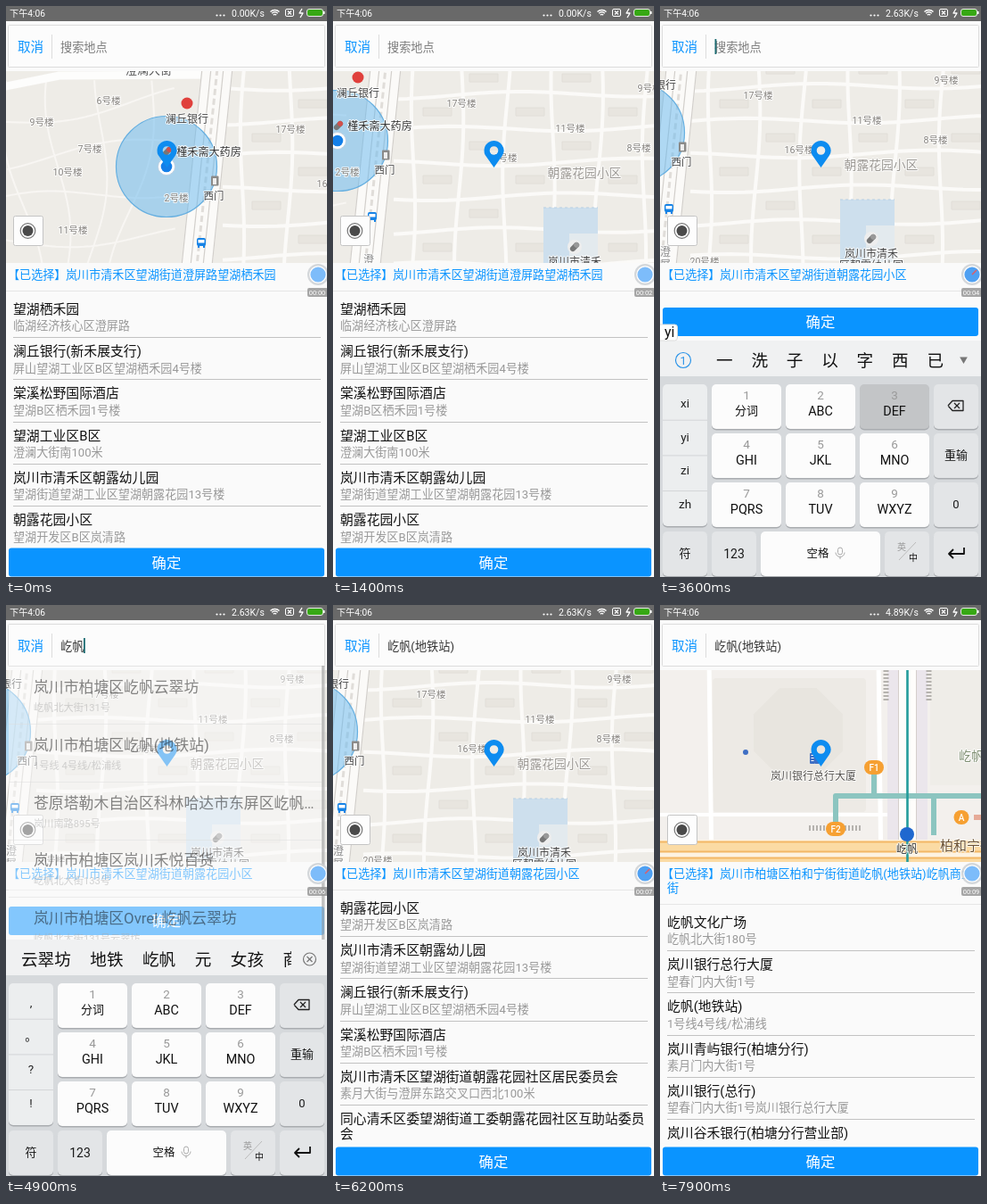
Write an HTML page with a canvas that moves like this. It is 360 px wide and 640 px high and loops after 8 s.

```html
<!DOCTYPE html>
<html lang="zh-CN">
<meta charset="utf-8">
<style>
html,body{margin:0;width:100%;height:100%;overflow:hidden;background:#fafafa}
canvas{display:block;width:360px;height:640px}
</style>
<canvas id="stage" width="360" height="640"></canvas>
<script>
const c = document.getElementById('stage').getContext('2d');
const BLUE = '#0a94ff', FONT = 'Roboto,"Noto Sans CJK SC","Noto Sans CJK",sans-serif';
const clamp = v => Math.min(1, Math.max(0, v));

// ---- drawing helpers; text is placed by its vertical centre ----
function txt(s, x, y, size, color, align = 'left', halo = 0, weight = 400) {
  c.font = `${weight} ${size}px ${FONT}`;
  c.textAlign = align;
  y += size * .36;
  if (halo) { c.strokeStyle = '#fffc'; c.lineWidth = halo; c.lineJoin = 'round'; c.strokeText(s, x, y); }
  c.fillStyle = color;
  c.fillText(s, x, y);
}
const label = (s, x, y, size, color = '#444') => txt(s, x, y, size, color, 'center', 2);
function rect(x, y, w, h, fill) { c.fillStyle = fill; c.fillRect(x, y, w, h); }
function paint(fill, stroke, w = 1) {
  if (fill) { c.fillStyle = fill; c.fill(); }
  if (stroke) { c.strokeStyle = stroke; c.lineWidth = w; c.stroke(); }
}
function box(x, y, w, h, r, fill, stroke) {
  c.beginPath(); c.roundRect(x, y, w, h, r); paint(fill, stroke);
}
function dot(x, y, r, fill, stroke, w) {
  c.beginPath(); c.arc(x, y, r, 0, 7); paint(fill, stroke, w);
}
function line(p, w, color, dash = []) {
  c.beginPath();
  for (let i = 0; i < p.length; i += 2) c.lineTo(p[i], p[i + 1]);
  c.setLineDash(dash); c.lineJoin = 'round';
  paint(null, color, w); c.setLineDash([]);
}
function ngon(x, y, r, n, fill, turn = 0) {
  c.beginPath();
  for (let i = 0; i < n; i++) {
    const a = turn + i / n * 2 * Math.PI;
    c.lineTo(x + r * Math.cos(a), y + r * Math.sin(a));
  }
  c.closePath(); paint(fill);
}
// gently winding lane between two points
function lane(x1, y1, x2, y2, w, color, bend = 4, phase = 0) {
  const p = [], dx = x2 - x1, dy = y2 - y1, len = Math.hypot(dx, dy);
  for (let i = 0; i <= 24; i++) {
    const f = i / 24, k = bend * Math.sin(f * len / 45 + phase) / len;
    p.push(x1 + dx * f - dy * k, y1 + dy * f + dx * k);
  }
  line(p, w, color);
}
function cross(x, y, r, color) {
  line([x - r, y - r, x + r, y + r], 1.2, color);
  line([x + r, y - r, x - r, y + r], 1.2, color);
}

// ---- texts ----
const addresses = [
  ['岚川市清禾区望湖街道澄屏路望湖栖禾园'],
  ['岚川市清禾区望湖街道朝露花园小区'],
  ['岚川市柏塘区柏和宁街街道屹帆(地铁站)屹帆商业', '街']
];
const garden = '朝露花园小区|望湖开发区B区岚清路';
const nursery = '岚川市清禾区朝露幼儿园|望湖街道望湖工业区望湖朝露花园13号楼';
const bank = '澜丘银行(新禾展支行)|屏山望湖工业区B区望湖栖禾园4号楼';
const hotel = '棠溪松野国际酒店|望湖B区栖禾园1号楼';
const lists = [
  ['望湖栖禾园|临湖经济核心区澄屏路', bank, hotel, '望湖工业区B区|澄澜大街南100米', nursery, garden],
  [garden, nursery, bank, hotel,
    '岚川市清禾区望湖街道朝露花园社区居民委员会|素月大街与澄屏东路交叉口西北100米',
    '同心清禾区委望湖街道工委朝露花园社区互助站委员|会'],
  ['屹帆文化广场|屹帆北大街180号',
    '岚川银行总行大厦|望春门内大街1号',
    '屹帆(地铁站)|1号线4号线/松浦线',
    '岚川青屿银行(柏塘分行)|素月门内大街1号',
    '岚川银行(总行)|望春门内大街1号岚川银行总行大厦',
    '岚川谷禾银行(柏塘分行营业部)|']
];
const results = [
  '岚川市柏塘区屹帆云翠坊|屹帆北大街131号',
  '岚川市柏塘区屹帆(地铁站)|1号线 4号线/松浦线',
  '苍原塔勒木自治区科林哈达市东屏区屹帆…|岚川南路895号',
  '岚川市柏塘区岚川禾悦百货|屹帆北大街133号',
  '岚川市柏塘区Ovrel 屹帆云翠坊|屹帆北大街131号云翠坊'
];

// ---- maps ----
function busIcon(x, y) {
  box(x - 5, y - 5, 10, 9, 2, '#1683e6');
  rect(x - 3.5, y - 3, 7, 3.5, '#fff');
  for (const d of [-4, 2]) rect(x + d, y + 3, 2, 3, '#1683e6');
}
function towerIcon(x, y) {
  box(x - 4, y - 6, 6, 12, 1, '#3f6fc4'); rect(x + 2, y - 1, 4, 7, '#3f6fc4');
  for (let i = 0; i < 3; i++) rect(x - 2.5, y - 4 + i * 3, 3, 1, '#fff');
}
function pill(x, y, color) {
  c.save(); c.translate(x, y); c.rotate(-.8);
  box(-6, -3, 12, 6, 3, '#777'); box(0, -3, 6, 6, 3, color);
  c.restore();
}

function suburbMap(shift) {
  rect(-20, 40, 640, 330, '#eeece7');
  // footpaths west of the avenue, garden lanes east of it
  for (let i = 0; i < 4; i++) {
    lane(i * 55, 84, i * 32 + 30, 300, 2, '#f8f6f3', 12, i);
    lane(0, 130 + i * 45, 190, 100 + i * 52, 2, '#f8f6f3', 9, i * 2);
  }
  for (let i = 0; i < 7; i++) {
    lane(243, 92 + i * 38, 610, 88 + i * 38, 4, '#fbfaf8', 3.5, i * 1.7);
    lane(268 + i * 52, 60, 262 + i * 52, 340, 4, '#fbfaf8', 3.5, i * 2.3);
    for (let j = 0; j < 7; j++)
      if ((i + j) % 2) box(276 + i * 52, 105 + j * 38, 32, 9, 0, '#e8e5df', '#e1ded8');
  }
  line([-10, 92, 60, 78, 240, 77], 9, '#fdfdfc');
  // avenue with side lanes
  const avenue = d => [238 + d, 60, 210 + d, 330];
  line(avenue(0), 35, '#fbfaf8');
  for (const d of [-17, -7, 7, 17]) line(avenue(d), 1.2, '#d2cfcb');
  line(avenue(0), 3, '#e0ddd9', [7, 4]);
  // pond
  rect(411, 255, 61, 70, '#cddfed'); rect(440, 284, 32, 41, '#e3eaee');
  line([411, 255, 472, 255], 1.2, '#b8d0e4', [3, 3]);

  dot(180, 180, 56.5, 'rgba(100,184,240,.5)', '#66afe0', 1.2);
  dot(180, 180, 9.5, '#fff', '#bcd', .8); dot(180, 180, 6.3, '#147fe8');
  const blocks = '6,115,106 9,40,130 7,94,160 10,69,186 11,75,251 2,191,215 17,319,138 16,365,199 9,530,121 11,441,166 8,518,188 20,259,324';
  for (const b of blocks.split(' ')) {
    const [n, x, y] = b.split(',');
    label(n + '号楼', +x, +y, 10.6, '#85827e');
  }
  label('澄澜大街', 160, 71, 13, '#555');
  dot(203, 109, 6.5, '#e0403c');
  label('澜丘银行', 203, 127, 12);
  if (181 + shift > -10) { // dropped once its icon leaves the view
    pill(181, 163, '#d0504c');
    label('槿禾斋大药房', 227.5, 164, 12.1, '#333');
  }
  box(230, 190.5, 8.5, 11, 1, '#8b8a88'); rect(232, 193, 4, 7, '#eee');
  label('西门', 233, 213, 11.4);
  busIcon(219, 265);
  [...'澄屏'].forEach((s, i) => label(s, 215, 314 + i * 14, 12, '#888'));
  label('朝露花园小区', 457, 216, 13.8, '#9b9893');
  dot(446, 299, 8, '#eee'); pill(446, 299, '#999');
  label('岚川市清禾', 446, 316, 12);
  label('区朝露幼儿园', 446, 329, 12);
}

function badge(s, x, y) {
  const w = s.length > 1 ? 22 : 17;
  box(x - w / 2, y - 8, w, 16, 8, '#f6a032');
  txt(s, x, y, 10, '#fff', 'center', 0, 500);
}
function cityMap() {
  const mid = 203, axis = 180.5;
  rect(-110, -20, 560, 340, '#f3f0ed');
  rect(206, -10, 170, 135, '#efede8');
  for (const x of [158, 191]) rect(x, -20, 12, 340, '#ebe6ec');
  box(-38, 5, 172, 150, 4, '#edeae5'); ngon(58, 66, 54, 8, '#e8e5df', .39);
  for (const x of [-42, 148, 326]) line([x, -20, x + 4, 310], 5, '#fff');
  for (const s of [-1, 1]) line([-110, mid + s * 45, 158, mid + s * 45], 4, '#fff');
  // avenue: white to the north, trunk colour to the south
  rect(axis - 10, -20, 20, 340, '#fefdfb');
  for (const s of [-1, 1]) {
    line([axis + s * 10, -20, axis + s * 10, 310], 1, '#d5cfcb');
    line([axis + s * 6, mid, axis + s * 6, 310], 8, '#f3b765');
    line([axis + s * 6, mid, axis + s * 6, 310], 5.5, '#fbdba4');
  }
  // boulevard carriageways
  rect(-110, mid - 17, 560, 34, '#fdf3e2');
  for (const s of [-1, 1]) {
    line([-110, mid + s * 9, 450, mid + s * 9], 13, '#f3b765');
    line([-110, mid + s * 9, 450, mid + s * 9], 9, '#fbdba4');
  }
  // subway passages and exits mirror each other across the boulevard
  line([143, 105, 143, mid - 66], 6, '#8cc5c0');
  for (const s of [-1, 1]) {
    const at = d => mid + s * d;
    line([100, at(29), 100, at(66), 345, at(66)], 6, '#8cc5c0');
    line([210, at(66), 210, at(22)], 6, '#8cc5c0');
    line([255, at(42), 301, at(42), 301, at(20)], 6, '#e6aa98');
    line([70, at(30), 130, at(30)], 6, '#b5b2ae', [2, 2]);
    line([axis + s * 24, -4, axis + s * 24, 30], 6, '#b5b2ae', [2, 2]);
    badge(s < 0 ? 'F2' : 'J2', 100, at(29));
    badge(s < 0 ? 'A' : 'E', s < 0 ? 241 : 266, at(42));
  }
  line([axis, -20, axis, 310], 2.6, '#239c9b');
  line([320, 78, 354, 78, 354, 110], 6, '#b5b2ae', [2, 2]);
  badge('F1', 143, 105); badge('H', 228, 232);
  towerIcon(75, 95); label('岚川银行总行大厦', 75, 115, 12, '#55524f');
  towerIcon(76, 279); dot(-1, 88, 3, '#3f6fc4');
  ['岚川谷禾银', '行大厦北楼'].forEach((s, i) => label(s, 34, 272 + i * 14, 12, '#55524f'));
  label('屹帆文化广场', 280, 92, 14, '#7d8d70');
  label('柏和宁街', 247, 193, 15, '#6b5335');
  dot(299, 157, 8, '#f4efe8', '#d8cfc6'); rect(296, 154, 6, 6, '#8b5e48');
  label('禾汐', 299, 174, 12, '#6b4c3c');
  box(307, 248, 14, 14, 4, '#fff', '#ccd'); txt('P', 314, 255, 11, '#2a72d8', 'center', 0, 700);
  dot(180, 180, 8, '#1f68cf');
  label('屹帆', 180, 197, 12, '#333');
}

function drawMap(T) {
  c.save();
  c.beginPath(); c.rect(0, 73, 360, 215); c.clip();
  if (T < 6300) {
    const p = clamp((T - 300) / 1400), dx = Math.round(-209 * (1 - (1 - p) ** 1.17));
    c.translate(dx, Math.round(-38 * p ** 1.18));
    suburbMap(dx);
  } else {
    const p = clamp((T - 7400) / 500);
    c.translate(Math.round(97 * p), Math.round(77 * p));
    cityMap();
  }
  c.restore();
  // centre pin with an open hole
  c.beginPath();
  c.moveTo(180.5, 181); c.arc(180.5, 162, 11, 2.525, .617); c.closePath();
  c.moveTo(185.3, 162); c.arc(180.5, 162, 4.8, 0, 7);
  c.fillStyle = '#0d8cf0'; c.fill('evenodd');
  box(8.5, 235.5, 33, 33, 2, '#fdfdfd', '#c4c4c4');
  dot(24.5, 252, 8.3, '#fff', '#777', 1.2); dot(24.5, 252, 6, '#4a4a4a');
}

// ---- interface ----
function statusBar(T) {
  rect(0, 0, 360, 17, '#696969');
  txt('下午4:06', 4, 8, 10.2, '#fff');
  for (let i = 0; i < 3; i++) {
    dot(236.5 + i * 4, 10.5, 1.1, '#fff');
    c.beginPath(); c.arc(301.5, 12, 2.5 + i * 2.5, -2.3, -.84); paint(null, '#fff', 1.4);
  }
  txt((T < 3000 ? '0.00' : T < 6800 ? '2.63' : '4.89') + 'K/s', 253, 8, 10.5, '#fff');
  box(313.5, 3.5, 9, 8, 1.5, null, '#fff');
  cross(318, 7.5, 2, '#fff');
  line([332, 3, 329, 8, 333, 8, 330, 13], 1.3, '#fff');
  box(337.5, 3.5, 18, 8, 2.5, '#37a814', '#e8e8e8'); rect(356, 6, 1.5, 3, '#fff');
}
function searchBox(T) {
  box(2.5, 21.5, 355, 47, 1, '#fcfcfc', '#dcdcdc');
  txt('取消', 13, 46, 14.6, BLUE);
  line([51.5, 32, 51.5, 59], 1, '#ddd');
  const query = T < 4500 ? '' : T < 6000 ? '屹帆' : '屹帆(地铁站)';
  txt(query || '搜索地点', 61, 46, 13.2, query ? '#333' : '#7c7c7c');
  const blink = T < 4500 || Math.floor(T / 500) % 2;
  if (T >= 2600 && T < 5800 && blink) rect(query ? 87 : 61.5, 37, 1.8, 17, '#1d6c72');
}
function placeList(T) {
  const [first, second] = addresses[T < 2100 ? 0 : T < 7100 ? 1 : 2];
  const shift = second ? 16 : 0;
  rect(0, 288, 360, 352, '#fafafa');
  rect(0, 319 + shift, 360, 1, '#e6e6e6');
  txt('【已选择】', 2, 301, 13.1, BLUE);
  txt(first, 67, 301, 13.1, BLUE);
  if (second) txt(second, 8, 317, 13.1, BLUE);
  lists[T < 2200 ? 0 : T < 7100 ? 1 : 2].forEach((row, i) => {
    const [title, sub] = row.split('|'), y = 339.5 + shift + i * 47.3;
    const wrapped = sub.length == 1;
    txt(title, 8, y, 14.85, '#111');
    txt(sub, 8, y + (wrapped ? 17 : 19), wrapped ? 14.85 : 13.1, wrapped ? '#111' : '#999');
    if (i < 5) rect(8, Math.round(y + 31.5), 345, 1, '#c2c2c2');
  });
}
function okButton(y) {
  rect(0, y - 4, 360, 40, '#fafafa');
  box(3, y, 354, 32, 3, BLUE);
  txt('确定', 180, y + 16.5, 16.4, '#fff', 'center');
}
function dropdown(T) {
  c.save();
  c.globalAlpha = clamp((T - 4800) / 200);
  c.beginPath(); c.rect(3, 68, 355, 307); c.clip();
  rect(3, 68, 355, 307, '#fbfbfb');
  rect(3, 68, 355, 1, '#ddd');
  results.forEach((row, i) => {
    const [title, sub] = row.split('|'), y = 92 + i * 64.8;
    const tapped = i == 1 && T >= 5800;
    txt(title, 31, y, 16.85, tapped ? '#cfcfcf' : '#111');
    txt(sub, 31, y + 23, 11.2, tapped ? '#e4e4e4' : '#aaa');
    if (!tapped) rect(3, Math.round(y + 41), 351, 1, '#ddd');
  });
  rect(354, 68, 3.5, 307, '#8c8c8c');
  c.restore();
}

function key(x, row, w, s = '', size = 13, fill = '#e3e5e7') {
  const y = 424 + row * 55;
  box(x, y + 1.5, w, 50, 5, '#a9acb0');
  box(x, y, w, 50, 5, fill);
  txt(s, x + w / 2, y + 24.5, size, '#1a1a1a', 'center');
}
function candidates(T, typing) {
  rect(0, 375, 360, 41, '#f0f1f2');
  const put = (s, x) => txt(s, x, 397, 18.6, '#111');
  if (typing) {
    const tag = 'yifan'.slice(0, Math.floor((T - 3100) / 200));
    c.font = '16px ' + FONT;
    box(-3, 357, c.measureText(tag).width + 11, 18, 3, '#fff', '#ddd');
    txt(tag, 5, 365, 16, '#111');
    dot(26, 397, 8.5, null, '#2a93e8', 1.2); txt('1', 26, 397, 12.5, '#2a93e8', 'center');
    if (tag.length < 3) [...'一洗子以字西已'].forEach((s, i) => put(s, 63 + i * 39.4));
    else ['屹帆', '一番', '一份', '一', '以'].forEach((s, i) => put(s, 54 + i * 59));
    ngon(340.5, 396, 5, 3, '#777', Math.PI / 2);
  } else if (T >= 4500) {
    c.save(); c.beginPath(); c.rect(0, 375, 320, 41); c.clip();
    let x = 17;
    for (const s of ['云翠坊', '地铁', '屹帆', '元', '女孩', '商']) {
      put(s, x);
      x += s.length * 18.6 + 21.5;
    }
    c.restore();
    dot(340.5, 397, 7, null, '#777', 1.2); cross(340.5, 397, 3, '#777');
  }
}
function keyboard(T, slide) {
  const typing = T >= 3300 && T < 4500;
  c.save();
  c.translate(0, slide);
  candidates(T, typing);
  rect(0, 415, 360, 225, '#d6d9dc');
  box(3, 425.5, 50, 159, 5, '#a9acb0');
  box(3, 424, 50, 159, 5, '#eceeef');
  (typing ? ['xi', 'yi', 'zi', 'zh'] : [',', '。', '?', '!']).forEach((s, i) => {
    txt(s, 28, 445 + i * 37.7, 13.5, '#222', 'center');
    if (i) rect(3, 424 + i * 39.7, 50, 1, '#d3d5d7');
  });
  const pressed = typing && T % 200 == 0 ? '94326'[(T - 3200) / 200] : 0;
  ['分词', 'ABC', 'DEF', 'GHI', 'JKL', 'MNO', 'PQRS', 'TUV', 'WXYZ'].forEach((s, i) => {
    const x = 58 + i % 3 * 83, row = Math.floor(i / 3), y = 424 + row * 55;
    key(x, row, 78, '', 0, pressed == i + 1 ? '#c3c5c7' : '#fcfcfc');
    txt(i + 1, x + 39, y + 12.5, 13.5, '#999', 'center');
    txt(s, x + 39, y + 29.5, i ? 14.4 : 13, '#111', 'center');
  });
  ['', '重输', '0', ''].forEach((s, i) => key(307, i, 50, s));
  key(3, 3, 50, '符'); key(58, 3, 50, '123', 14);
  key(113, 3, 134, '', 0, '#fcfcfc'); key(252, 3, 50);
  // backspace, enter, space, language
  line([323, 448, 328, 442.5, 340, 442.5, 340, 453.5, 328, 453.5, 323, 448], 1.3, '#222');
  cross(333, 448, 3, '#222');
  line([341, 607, 341, 614, 324, 614], 1.8, '#111'); line([329, 609, 324, 614, 329, 619], 1.8, '#111');
  txt('空格', 177, 613, 12.5, '#111', 'center', 0, 500);
  box(199.5, 607, 5, 8, 2.5, null, '#aaa');
  c.beginPath(); c.arc(202, 612.5, 5, 0, Math.PI); c.stroke(); line([202, 617, 202, 620], 1, '#aaa');
  txt('英', 271, 606, 10, '#999', 'center'); line([268, 621, 287, 601], 1, '#bbb');
  txt('中', 284, 618, 10, '#111', 'center', 0, 500);
  c.restore();
}
function recorder(T) {
  const s = Math.round(T * .00115);
  dot(350, 301, 12, 'rgba(205,208,212,.85)'); dot(350, 301, 9.8, '#fff');
  dot(350, 301, 8.6, s % 3 == 1 ? '#4fa0f2' : '#7dbcfa');
  if (s % 3 == 1) line([350, 301, 355, 296], 1.6, '#d8606c');
  box(338, 316, 23, 10, 2, 'rgba(150,150,150,.85)');
  txt('00:0' + s, 349, 321, 7.5, '#fff', 'center');
}

function draw(T) {
  rect(0, 0, 360, 640, '#fafafa');
  drawMap(T);
  placeList(T);
  const raised = T >= 3000 && T < 6200;
  if (raised) rect(0, 321, 360, 319, '#fafafa');
  okButton(raised ? 338 : 607.5);
  searchBox(T);
  if (T >= 4900 && T < 6000) dropdown(T);
  if (T >= 2600 && T < 6200) {
    const hidden = Math.max(1 - clamp((T - 2500) / 300), clamp((T - 6000) / 200));
    keyboard(T, 265 * hidden ** 2);
  }
  recorder(T);
  statusBar(T);
}
function tick(now) {
  draw(Math.floor(now % 8000 / 100) * 100);
  requestAnimationFrame(tick);
}
tick(performance.now());
</script>
</html>
```
